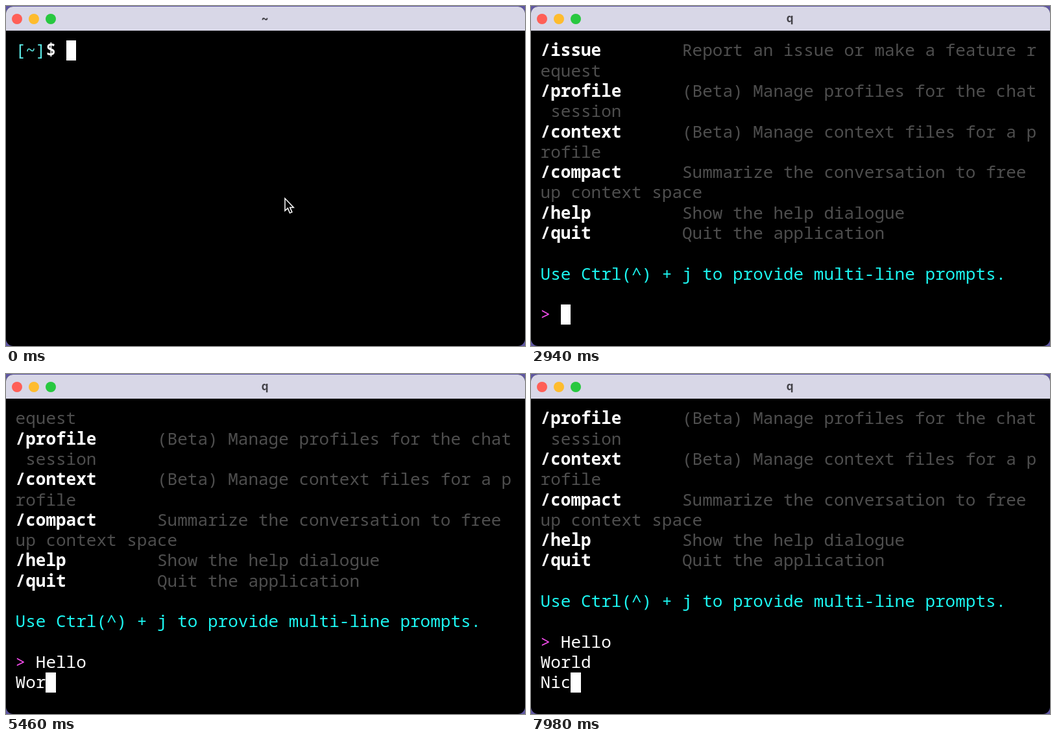
These frames come from a looping animation (800x524 px, 8 s). An HTML page:

```html
<!DOCTYPE html>
<html lang="en">
<head>
<meta charset="utf-8">
<title>Terminal</title>
<style>
  html, body { margin: 0; width: 100%; height: 100%; overflow: hidden; background: #5f57a2; }
  #window { position: absolute; left: 0; top: 1px; width: 800px; height: 523px; overflow: hidden;
    border-radius: 11px; background: #000; }
  #bar { height: 37px; background: #d8d7e7; }
  #title { position: absolute; left: 0; top: 0; width: 798px; line-height: 37px; text-align: center;
    font: 700 17px/37px Inter, sans-serif; color: #434248; }
  .light { position: absolute; top: 11px; width: 16px; height: 16px; border-radius: 50%; }
  #view { position: absolute; left: 14.6px; top: 51.3px; width: 770px; height: 439.2px; overflow: hidden; }
  #text { position: absolute; left: 0; margin: 0; width: 767px; color: #fff;
    font: 26px/31.3px "Noto Sans Mono", monospace; font-variant-ligatures: none;
    white-space: break-spaces; line-break: anywhere; }
  .path { color: #5ce8e4; }
  .dim { color: #4e4e4e; }
  .tip { color: #1cf5f0; }
  .mark { color: #f14be9; }
  .caret { display: inline-block; position: relative; top: 1px; width: 15.6px; height: 31px;
    background: #fff; vertical-align: top; }
  #mouse { position: absolute; left: 0; top: 0; }
</style>
</head>
<body>
<div id="window">
  <div id="bar"></div>
  <i class="light" style="left:9px;background:#ff5f57"></i>
  <i class="light" style="left:35px;background:#febc2e"></i>
  <i class="light" style="left:61px;background:#28c840"></i>
  <div id="title"></div>
  <div id="view"><pre id="text"></pre></div>
</div>
<svg id="mouse" width="800" height="524">
  <path d="M430 296.5V315.5L434.4 311.6L437.5 319L440.9 317.6L437.7 310.4H443.3Z"
    fill="#000" stroke="#fff" stroke-width="1.5"/>
</svg>
<script>
const LOOP = 8000, KEY_Q = 980, ENTER = 2100, CHAT = 2310;

const commands = {
  issue: 'Report an issue or make a feature request',
  profile: '(Beta) Manage profiles for the chat session',
  context: '(Beta) Manage context files for a profile',
  compact: 'Summarize the conversation to free up context space',
  help: 'Show the help dialogue',
  quit: 'Quit the application',
};

const message = 'Hello\nWorld\nNic';
const keyTimes = [
  3080, 3290, 3430, 3500, 3640,
  5110, 5250, 5390, 5460, 5600, 5740,
  7140, 7700, 7840, 7980,
];

const span = (style, text) => `<span class="${style}">${text}</span>`;
const caret = span('caret', '');
const shell = span('path', '[~]') + '<b>$</b> ';
const help = Object.entries(commands).map(([name, about]) =>
  `<b>${('/' + name).padEnd(14)}</b>${span('dim', about)}\n`).join('');
const intro = help + '\n' +
  span('tip', 'Use Ctrl(^) + j to provide multi-line prompts.') +
  '\n\n' + span('mark', '&gt;') + ' ';

const [title, text, mouse] = ['title', 'text', 'mouse'].map(id => document.getElementById(id));
let shown;

function screenAt(t) {
  if (t < KEY_Q) return shell;
  if (t < ENTER) return shell + 'q';
  if (t < CHAT) return shell + 'q\n';
  return intro + message.slice(0, keyTimes.filter(k => k <= t).length);
}

function draw(now) {
  const t = now % LOOP;
  const screen = screenAt(t);
  if (screen !== shown) {
    shown = screen;
    text.innerHTML = screen + caret;
    // Once the chat fills the view, new lines push the text up.
    text.style.top = t < CHAT ? '0' : 'auto';
    text.style.bottom = t < CHAT ? 'auto' : '1px';
    title.textContent = t < ENTER ? '~' : 'q';
    mouse.style.display = t < KEY_Q ? '' : 'none';
  }
  requestAnimationFrame(draw);
}
draw(performance.now());
</script>
</body>
</html>
```
